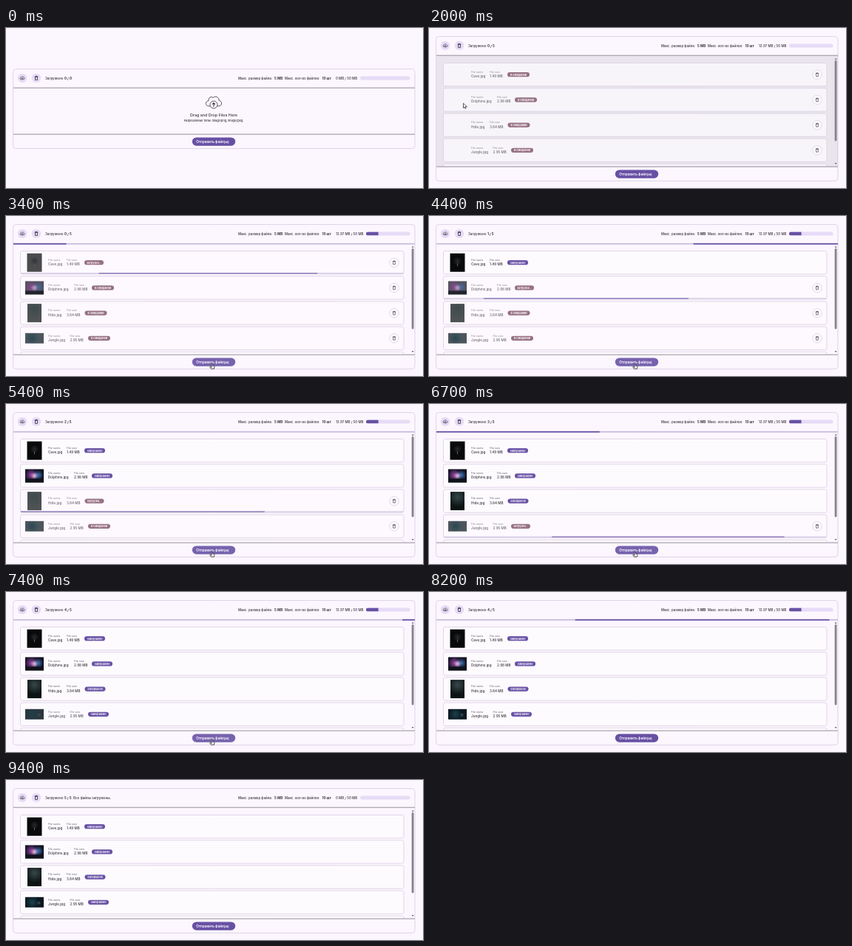
Animation, 564 px wide and 217 px high, one loop 9.5 s. Source, as an HTML page with a canvas:

```html
<!DOCTYPE html>
<html lang="ru">
<head>
<meta charset="utf-8">
<title>File uploader</title>
<style>
  html, body { margin: 0; width: 100%; height: 100%; overflow: hidden; background: #fcf6fe; }
  canvas { display: block; width: 564px; height: 217px; }
</style>
</head>
<body>
<canvas id="stage"></canvas>
<script>
const canvas = document.getElementById('stage');
const ctx = canvas.getContext('2d');
const dpr = window.devicePixelRatio || 1;
canvas.width = 564 * dpr;
canvas.height = 217 * dpr;

const LOOP = 9500, DRAG = 1600, DROP = 1900, THUMBS = 2200, START = 3330;
const PAGE = '#fcf6fe', INK = '#39353e', PRIMARY = '#6750a4', TRACK = '#c5bcdc';
const GRAY = '#969199', BORDER = '#d8cee1';
const files = [
  { name: 'Cave.jpg', size: '1.49 MB', sizeX: 82, badgeX: 106, w: 20, h: 25, done: 4050 },
  { name: 'Dolphins.jpg', size: '2.98 MB', sizeX: 92, badgeX: 116, w: 25, h: 18, done: 5100 },
  { name: 'Hide.jpg', size: '3.84 MB', sizeX: 82, badgeX: 106.5, w: 19, h: 25, done: 6100 },
  { name: 'Jungle.jpg', size: '2.95 MB', sizeX: 86.5, badgeX: 111, w: 25, h: 14, done: 7300 },
  { name: 'River.jpg', size: '2.71 MB', sizeX: 82, badgeX: 106, w: 25, h: 16, done: 8700 }
];
const END = files[4].done;

const clamp = v => Math.max(0, Math.min(1, v));
const ramp = (t, from, length) => clamp((t - from) / length);
const mix = (a, b, k) => a + (b - a) * k;

function bezier(x1, y1, x2, y2) {
  const at = (u, a, b) => 3 * (1 - u) ** 2 * u * a + 3 * (1 - u) * u * u * b + u ** 3;
  return x => {
    let lo = 0, hi = 1;
    for (let i = 0; i < 20; i++) {
      const mid = (lo + hi) / 2;
      if (at(mid, x1, x2) < x) lo = mid; else hi = mid;
    }
    return at(lo, y1, y2);
  };
}
const easeLong = bezier(.65, .815, .735, .395);
const easeShort = bezier(.165, .84, .44, 1);

function rect(x, y, w, h, fill) {
  ctx.fillStyle = fill;
  ctx.fillRect(x, y, w, h);
}

function round(x, y, w, h, r, fill, stroke) {
  ctx.beginPath();
  ctx.roundRect(x, y, w, h, r);
  if (fill) { ctx.fillStyle = fill; ctx.fill(); }
  if (stroke) { ctx.strokeStyle = stroke; ctx.lineWidth = .8; ctx.stroke(); }
}

// Set large and scaled down, so that tiny glyphs keep fractional advances
function text(str, x, y, size, { color = INK, weight = 500, align = 'left' } = {}) {
  const zoom = 16;
  ctx.save();
  ctx.translate(x, y);
  ctx.scale(1 / zoom, 1 / zoom);
  ctx.font = `${weight} ${size * zoom}px Inter, sans-serif`;
  ctx.textAlign = align;
  ctx.fillStyle = color;
  ctx.fillText(str, 0, 0);
  const width = ctx.measureText(str).width / zoom;
  ctx.restore();
  return x + width;
}

function path(d, x, y, scale, stroke, width, fill) {
  ctx.save();
  ctx.translate(x, y);
  ctx.scale(scale, scale);
  ctx.lineWidth = width;
  ctx.lineJoin = ctx.lineCap = 'round';
  const shape = new Path2D(d);
  if (fill) { ctx.fillStyle = fill; ctx.fill(shape); }
  if (stroke) { ctx.strokeStyle = stroke; ctx.stroke(shape); }
  ctx.restore();
}

const TRASH = 'M-5 -5H5M-2 -5V-7H2V-5M-4 -5V7H4V-5';
const CLOUD = 'M-5 5H-7C-12 5 -12 -2 -7 -2.500C-8 -7 -3 -9 -1 -6.500C2 -10 8 -7 7 -3C12 -2 12 5 7 5H5';
const ARROW = 'M0 3V-3M-2.200 -1L0 -3.200L2.200 -1';
const POINTER = 'M0 0V8L2 6.300L3.300 9L4.600 8.400L3.300 5.800H6Z';
const HAND = 'M-.8 0C-.8 -1 .8 -1 .8 0V3L3.600 3.700Q4.500 4 4.300 5L3.500 8.500H-1.300L-3.500 5.300Q-3 4.200 -1.800 5L-.8 5.800Z';

function progress(t, phase, x, y, w, h) {
  rect(x, y, w, h, TRACK);
  const bar = (left, right) => {
    const a = clamp(left), b = clamp(right);
    if (b > a) rect(x + a * w, y, (b - a) * w, h, PRIMARY);
  };
  const since = t - phase;
  const p = easeLong(clamp(since % 2100 / 1260));
  bar(-.35 + 1.35 * p, 1.9 * p);
  if (since >= 1150) {
    const q = easeShort(clamp((since - 1150) % 2100 / 1260));
    bar(-2 + 3.07 * q, 1.08 * q);
  }
}

function header(t, top) {
  const cy = top + 12.4, base = cy + 1.8;
  const listed = t >= DROP, finished = t >= END;
  for (const x of [22, 41]) round(x - 6.2, cy - 6.2, 12.4, 12.4, 6.2, '#e6dcf5');
  path(CLOUD, 22, cy + .2, .28, '#1d192b', 2);
  path(ARROW, 22, cy + 1.3, .42, '#1d192b', 1.6);
  path(TRASH, 41, cy, .36, '#1d192b', 2);

  const bold = { weight: 700 };
  const done = files.filter(f => t >= f.done).length;
  text('Загружено', 53, base, 4.5);
  const x = text(`${done} / ${listed ? 5 : 0}`, 79, base, 4.5, bold);
  if (finished) text('. Все файлы загружены.', x, base, 4.5);
  text('Макс. размер файла:', 314, base, 4.4);
  text('5 MB', 363, base, 4.6, bold);
  text('Макс. кол-во файлов:', 377, base, 4.4);
  text('10 шт', 427.5, base, 4.5, bold);

  const counted = listed && !finished;
  text(counted ? '13.97 MB / 50 MB' : '0 MB / 50 MB', 446, base, 4.5);
  const left = counted ? 487 : 479, width = 546.5 - left;
  const fill = .2794 * (ramp(t, 2050, 400) - ramp(t, END, 400));
  round(left, cy - 2.5, width, 5, 2.5, '#e6dcf7');
  if (fill > 0) {
    ctx.save();
    ctx.beginPath();
    ctx.roundRect(left, cy - 2.5, width, 5, 2.5);
    ctx.clip();
    rect(left, cy - 2.5, width * fill, 5, PRIMARY);
    ctx.restore();
  }
  if (t >= START && !finished) progress(t, START, 10, top + 25.4, 543, 1.7);
  else rect(10, top + 25.2, 543, 1, GRAY);
}

function footer(t, bottom) {
  const hover = t >= 2950 && t < 7650;
  rect(10, bottom - 20.4, 543, 1, GRAY);
  round(251.8, bottom - 15.6, 58.4, 11.3, 5.6, hover ? '#7762ae' : PRIMARY);
  text('Отправить файл(ы)', 279.5, bottom - 8.3, 4.6, { color: '#fff', weight: 600, align: 'center' });
}

function dropZone() {
  path(CLOUD, 281, 101, .98, '#39353e', .85);
  ctx.beginPath();
  ctx.arc(281, 104, 5, 0, 7);
  ctx.fillStyle = PAGE;
  ctx.fill();
  ctx.strokeStyle = '#39353e';
  ctx.lineWidth = .8;
  ctx.stroke();
  path(ARROW, 281, 104, .75, '#29252e', 1.4);
  text('Drag and Drop Files Here', 281, 120.2, 5.35, { align: 'center' });
  text('Разрешенные типы: image/png, image/jpeg.', 281, 127, 3.75, { align: 'center' });
}

// Soft stand-ins for the photo previews
function thumb(index, cx, cy, w, h) {
  const x = cx - w / 2, y = cy - h / 2;
  const glow = (gx, gy, r, color) => {
    const g = ctx.createRadialGradient(gx, gy, 0, gx, gy, r);
    g.addColorStop(0, color);
    g.addColorStop(1, color + '00');
    rect(x, y, w, h, g);
  };
  rect(x, y, w, h, ['#08090b', '#11101f', '#0c1314', '#0a1820', '#18262a'][index]);
  if (index === 0) {
    glow(cx, cy - 2, 6, '#262b30');
    rect(cx - .5, cy + 1, 1, 4, '#5c6164');
  } else if (index === 1) {
    glow(cx - 4, cy - 1, 9, '#9a4aa8');
    glow(cx + 5, cy - 1, 7, '#3f76b8');
    glow(cx, cy, 5, '#ecc0de');
    rect(x, cy + 4, w, h / 2 - 4, '#11131b');
  } else if (index === 2) {
    glow(cx, y + 7, 13, '#38484a');
  } else {
    glow(cx - 3, cy, 9, '#1a424f');
    glow(cx + 6, cy + 1, 3, '#3f5453');
  }
}

function row(t, file, i) {
  const y = 47.5 + 34.2 * i, cy = y + 15.7;
  const begin = i ? files[i - 1].done : START;
  const done = t >= file.done, loading = t >= begin && !done;
  const shade = mix(.72, 1, ramp(t, file.done, 200));

  round(19.5, y, 518.5, 31.3, 2.5, `rgba(254,251,255,${shade})`, BORDER);
  ctx.save();
  ctx.globalAlpha = shade;
  if (t >= THUMBS) thumb(i, 38.5, cy, file.w, file.h);
  const label = { color: '#6d6872', weight: 400 };
  text('File name', 57, cy - 2.2, 3.6, label);
  text(file.name, 57, cy + 4, 4.6);
  text('File size', file.sizeX, cy - 2.2, 3.6, label);
  text(file.size, file.sizeX, cy + 4, 4.6);
  if (loading) progress(t, DROP + 18, 20, y + 29.5, 517.5, 1.3);
  ctx.restore();

  const state = done ? 'Завершено' : loading ? 'Загрузка...' : 'В ожидании';
  const width = done ? 28 : loading ? 26 : 30;
  round(file.badgeX, cy - 3.1, width, 6.2, 3.1, done ? PRIMARY : '#967080');
  text(state, file.badgeX + width / 2, cy + 1.3, 3.7, { color: '#fff', weight: 600, align: 'center' });
  if (!done) {
    round(518.7, cy - 6.3, 12.6, 12.6, 6.3, '#fcf8fe', '#ddd4e5');
    path(TRASH, 525, cy, .34, '#4b4651', 2);
  }
}

function list(t) {
  ctx.save();
  ctx.beginPath();
  ctx.rect(10, 39, 543, 148.5);
  ctx.clip();
  files.forEach((file, i) => row(t, file, i));
  round(548.7, 44, 2.8, 109.5, 1.4, '#85828a');
  path('M-1.500 1L0 -1L1.500 1Z', 550.1, 41.8, 1, null, 0, '#64616a');
  path('M-1.500 -1L0 1L1.500 -1Z', 550.1, 184, 1, null, 0, '#64616a');
  ctx.restore();
}

function cursor(t) {
  if (t < DRAG || t > 7950) return;
  const enter = ramp(t, DRAG, 250);
  const k = ramp(t, 2200, 800), s = k * k * (3 - 2 * k);
  const leave = ramp(t, 7550, 400) ** 2;
  const x = mix(mix(30, 46.5, enter), 278.5, s);
  const y = mix(mix(108, 102.5, enter), 200.5, s) + 22 * leave;
  const hand = t >= 2950 && t < 7700;
  path(hand ? HAND : POINTER, x, y, hand ? .8 : .75, '#27242b', 1, '#fff');
}

function draw(t) {
  const listed = t >= DROP;
  const top = listed ? 11.5 : 55.5, bottom = listed ? 208 : 164;
  ctx.setTransform(dpr, 0, 0, dpr, 0, 0);
  rect(0, 0, 564, 217, PAGE);
  round(9.5, top, 543.5, bottom - top - .5, 4, null, BORDER);
  const over = ramp(t, DRAG, 150) - ramp(t, 2050, 200);
  if (over > 0) rect(10, top + 26, 543, bottom - top - 46, `rgba(30,25,40,${.08 * over})`);
  if (listed) list(t); else dropZone();
  header(t, top);
  footer(t, bottom);
  cursor(t);
}

function tick() {
  draw(performance.now() % LOOP);
  requestAnimationFrame(tick);
}
tick();
</script>
</body>
</html>
```
